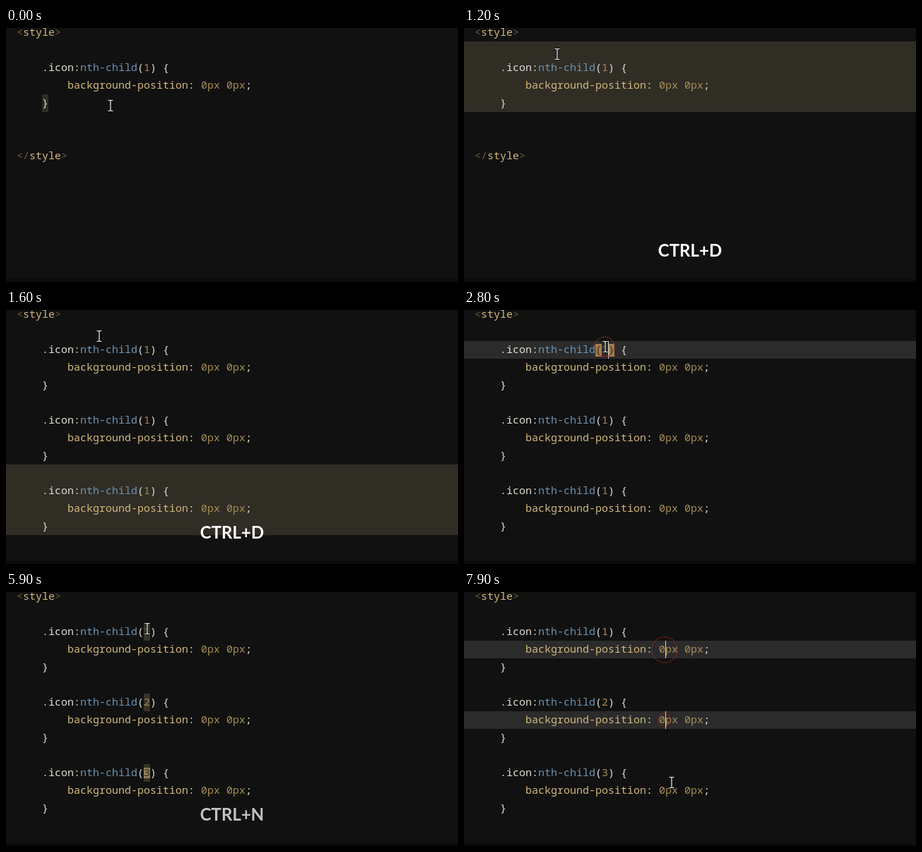
An HTML page for the animation above (8000 ms loop, 640 by 360 pixels).

```html
<!DOCTYPE html>
<html lang="en">
<head>
<meta charset="utf-8">
<title>Multiple cursors</title>
<style>
  html, body { margin: 0; width: 100%; height: 100%; overflow: hidden; background: #111; }
  svg { display: block; width: 100vw; height: 100vh; }
  .code { font: 15px "Noto Sans Mono", "DejaVu Sans Mono", monospace; white-space: pre; }
  .key { font: 700 24px Lato, "Open Sans", sans-serif; fill: #fff; text-anchor: middle; }
</style>
</head>
<body>
<svg id="stage" viewBox="0 0 640 360"></svg>
<script>
const LOOP = 8000, STEP = 100;
const COL = 9, LINE = 25, LEFT = 15;
const C = {
  plain: '#dfddd3', name: '#d3b87c', pseudo: '#6b93b3', num: '#a58d53',
  tag: '#6d5c3d', dark: '#38301f', select: '#302d25', active: '#2b2b2b',
  cell: '#37332a', match: '#8f7d59', paren: '#a07f4c'
};
const stage = document.getElementById('stage');

// time, x, y
const path = [
  [0, 148, 110], [200, 146, 132], [300, 146, 132], [800, 132, 37],
  [2000, 132, 37], [2400, 200, 52], [5900, 200, 52], [6200, 283, 82],
  [6400, 283, 82], [6500, 285, 83], [7300, 285, 83], [7600, 285, 181],
  [7700, 285, 181], [7900, 294, 270]
];
const clicks = [[200, 146, 132], [2400, 199, 52], [7200, 284, 82], [7700, 284, 181]];
// label, fade in from/to, fade out from/to
const keys = [
  ['CTRL+D', 900, 1100, 1900, 2200],
  ['CTRL+D', 2800, 3000, 4199, 4200],
  ['CTRL+N', 4700, 4900, 5800, 6200]
];

const clamp = v => Math.max(0, Math.min(1, v));
const smooth = v => v * v * (3 - 2 * v);
const colX = c => LEFT + c * COL;
const lineY = n => n * LINE - 6;
const rect = (x, y, w, h, fill) =>
  `<rect x="${x}" y="${y}" width="${w}" height="${h}" fill="${fill}"/>`;
const band = (line, count, fill) => rect(0, lineY(line), 640, count * LINE, fill);
const cell = (col, line, fill) => rect(colX(col), lineY(line), COL, LINE, fill);
const caret = (col, line) => rect(colX(col), lineY(line), 1, LINE, '#d8d8d8');

function text(line, col, ...parts) {
  const spans = parts.map(([s, color]) => `<tspan fill="${color}">${s}</tspan>`).join('');
  return `<text class="code" x="${colX(col)}" y="${line * LINE + 11}">${spans}</text>`;
}

function rule(line, n, digitColor, parenColor) {
  return text(line, 4, ['.icon:', C.plain], ['nth-child', C.pseudo], ['(', parenColor],
      [n, digitColor], [')', parenColor], [' {', C.plain]) +
    text(line + 1, 8, ['background-position', C.name], [': ', C.plain],
      ['0px 0px', C.num], [';', C.plain]) +
    text(line + 2, 4, ['}', C.plain]);
}

function mouseAt(t) {
  const i = path.findIndex(p => p[0] > t);
  if (i < 0) return path[path.length - 1].slice(1);
  const [t0, x0, y0] = path[i - 1], [t1, x1, y1] = path[i];
  const k = smooth((t - t0) / (t1 - t0));
  return [x0 + (x1 - x0) * k, y0 + (y1 - y0) * k];
}

function pointer([x, y]) {
  const d = 'M-3.5 -7.5H-1L0 -6.5L1 -7.5H3.5M0 -6.5V6.5M-3.5 7.5H-1L0 6.5L1 7.5H3.5';
  return `<g transform="translate(${x} ${y})" fill="none">
    <path d="${d}" stroke="#111" stroke-width="3"/>
    <path d="${d}" stroke="#eee" stroke-width="1.2"/></g>`;
}

function ripple(t, [start, x, y]) {
  const age = t - start;
  if (age < 0 || age >= 800) return '';
  const r = 22 * (1 - Math.exp(-age / 400));
  const alpha = 0.8 * clamp((1000 - age) / 350);
  return `<circle cx="${x}" cy="${y}" r="${r}" fill="none" stroke="#a63022"
    stroke-width="1.6" stroke-dasharray="1.6 1.4" opacity="${alpha}"/>`;
}

function keyLabel(t, [label, a, b, c, d]) {
  const alpha = Math.min(clamp((t - a) / (b - a)), clamp((d - t) / (d - c)));
  return alpha ? `<text class="key" x="320" y="324" opacity="${alpha}">${label}</text>` : '';
}

function draw(t) {
  const mouse = mouseAt(t);
  const blocks = t < 1300 ? 1 : t < 1500 ? 2 : 3;
  const picked = t < 3000 || t >= 7200 ? 0 : t < 3300 ? 1 : t < 3500 ? 2 : 3;
  const numbered = t >= 4900;
  const inParens = t >= 2400 && t < 3000;
  let back = '', code = '', front = '';

  if (t < 200) back += cell(4, 4, '#2f2d24');
  else if (t < 400) back += band(5, 1, C.active);
  else if (t < 900) {
    const top = Math.floor((mouse[1] + 6) / LINE);
    back += band(top, 5 - top, C.select);
  } else if (t < 2400) back += band(blocks * 4 - 3, 4, C.select);

  if (inParens) {
    back += band(2, 1, C.active);
    for (const c of [19, 21]) back += rect(colX(c), 48, COL, 18, C.paren);
    front += caret(21, 2);
  }
  if (t >= 7200) {
    back += band(3, 1, C.active);
    front += caret(30, 3);
  }
  if (t >= 7700) {
    back += band(7, 1, C.active);
    front += caret(30, 7);
  }

  for (let i = 0; i < blocks; i++) {
    const line = 2 + i * 4;
    const lit = i < picked && (!numbered || i === 2);
    if (i < picked) back += cell(20, line, C.cell);
    if (lit) back += rect(colX(20), lineY(line) + 5, COL, 15, C.match);
    code += rule(line, numbered ? i + 1 : 1, lit ? C.dark : C.num,
      inParens && !i ? C.dark : C.plain);
  }
  code += text(0, 0, ['&lt;', C.tag], ['style', C.name], ['&gt;', C.tag]);
  code += text(3 + blocks * 4, 0, ['&lt;/', C.tag], ['style', C.name], ['&gt;', C.tag]);

  stage.innerHTML = rect(0, 0, 640, 360, '#111') + back + code +
    rect(0, 356, 640, 4, '#0b0b0b') + front +
    clicks.map(c => ripple(t, c)).join('') + pointer(mouse) +
    keys.map(k => keyLabel(t, k)).join('');
}

let shown = -1;
function tick() {
  const t = Math.floor(performance.now() % LOOP / STEP) * STEP;
  if (t !== shown) draw(shown = t);
  requestAnimationFrame(tick);
}
tick();
</script>
</body>
</html>
```
